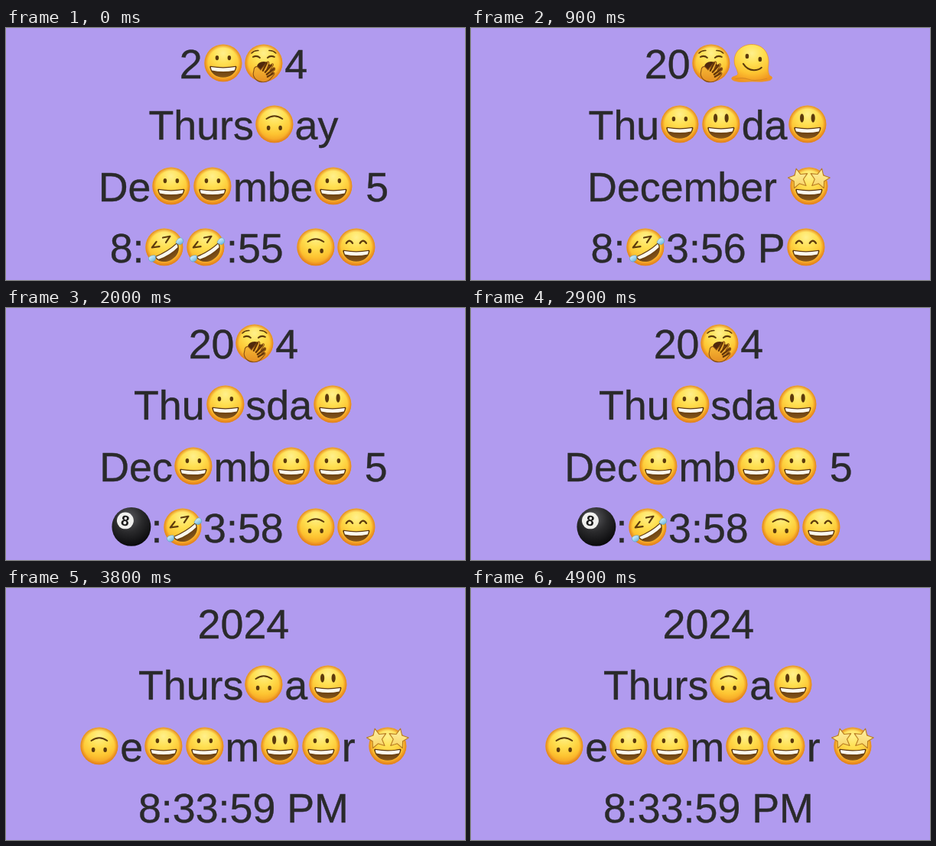
Animation, 600 px wide and 330 px high, one loop 5 s. Source, as an HTML page:

```html
<!DOCTYPE html>
<html lang="en">
<head>
<meta charset="utf-8">
<title>Emoji clock</title>
<style>
  html, body { margin: 0; width: 100%; height: 100%; overflow: hidden; background: #b19bef; }
  #reel { animation: flip 5s step-end infinite; }
  .scene { position: relative; width: 600px; height: 330px; overflow: hidden; }
  .row {
    position: absolute; left: 10.4px; width: 600px; height: 80px;
    font: 53.75px/80px "Liberation Sans", Arial, Helvetica, sans-serif;
    color: #2a2a2b; -webkit-text-stroke: .4px #2a2a2b;
    text-align: center; white-space: pre;
  }
  .row svg { width: 1em; height: 1em; vertical-align: -7px; overflow: visible; -webkit-text-stroke: 0; }
  .defs { position: absolute; width: 0; height: 0; }
  @keyframes flip {
    0% { transform: translateY(0); }
    4% { transform: translateY(-330px); }
    22% { transform: translateY(-660px); }
    39% { transform: translateY(-990px); }
    60% { transform: translateY(-1320px); }
    75%, 100% { transform: translateY(-1650px); }
  }
</style>
</head>
<body>
<svg class="defs">
  <defs>
    <radialGradient id="skin" cx=".5" cy=".24" r=".78">
      <stop offset="0" stop-color="#fff08c"/>
      <stop offset=".35" stop-color="#ffe052"/>
      <stop offset=".68" stop-color="#fdc431"/>
      <stop offset="1" stop-color="#f09320"/>
    </radialGradient>
    <radialGradient id="rim" cx=".5" cy=".5" r=".5">
      <stop offset=".8" stop-color="#e8801c" stop-opacity="0"/>
      <stop offset="1" stop-color="#dc7a1c" stop-opacity=".85"/>
    </radialGradient>
    <radialGradient id="ball" cx=".42" cy=".28" r=".72">
      <stop offset="0" stop-color="#5c5c60"/>
      <stop offset=".5" stop-color="#2a2a2c"/>
      <stop offset="1" stop-color="#0a0a0c"/>
    </radialGradient>
    <linearGradient id="mouth" x2="0" y2="1">
      <stop offset="0" stop-color="#55300c"/>
      <stop offset="1" stop-color="#87571a"/>
    </linearGradient>
    <linearGradient id="hand" x2="0" y2="1">
      <stop offset="0" stop-color="#fcc53a"/>
      <stop offset="1" stop-color="#e58f22"/>
    </linearGradient>
    <linearGradient id="gold" x2="0" y2="1">
      <stop offset="0" stop-color="#fff2a6"/>
      <stop offset="1" stop-color="#f8d466"/>
    </linearGradient>
    <linearGradient id="tear" x2="0" y2="1">
      <stop offset="0" stop-color="#d4f0fb"/>
      <stop offset="1" stop-color="#6db6e0"/>
    </linearGradient>
  </defs>
</svg>
<div id="reel"></div>
<script>
const INK = '#5c3a0c';
const skin = '<circle r="24.6" fill="url(#skin)"/><circle r="24.6" fill="url(#rim)"/>';

const line = (d, w = 2, color = INK) =>
  `<path d="${d}" fill="none" stroke="${color}" stroke-width="${w}" stroke-linecap="round" stroke-linejoin="round"/>`;
const move = (how, body) => `<g transform="${how}">${body}</g>`;
const mirror = body => body + move('scale(-1 1)', body);
const eyes = (x, y, rx, ry) =>
  mirror(`<ellipse cx="${x}" cy="${y}" rx="${rx}" ry="${ry}" fill="${INK}"/>`);

const grin = `
  <path d="M-16.5 4Q0 7 16.5 4Q18 4 17.6 6C16 14 9 19 0 19S-16 14-17.6 6Q-18 4-16.5 4Z" fill="url(#mouth)"/>
  <path d="M-16 5.2Q0 8.2 16 5.2Q16.2 7.6 14.8 9.6Q0 13-14.8 9.6Q-16.2 7.6-16 5.2Z" fill="#fbf8ee"/>`;
const squint = mirror(line('M5-11.5L14-8L5-4', 2.2));

function star(x, y, turn) {
  const pts = [];
  for (let i = 0; i < 10; i++) {
    const r = i % 2 ? 6.6 : 13.6, a = i * Math.PI / 5 - Math.PI / 2;
    pts.push((r * Math.cos(a)).toFixed(1) + ',' + (r * Math.sin(a)).toFixed(1));
  }
  return move(`translate(${x} ${y}) rotate(${turn})`,
    `<polygon points="${pts.join(' ')}" fill="url(#gold)" stroke="#b87c22" stroke-width="1.1" stroke-linejoin="round"/>`);
}

const drop = '<path d="M16 3C21-1 26.5 0 26 4.5C25.5 9 20 9.5 18 7Q16.5 5.5 16 3Z" fill="url(#tear)" stroke="#5a9fc4" stroke-width=".6"/>';

const yawn = skin
  + line('M-16-13Q-12-17-7-16.5', 1.5) + line('M7-16.5Q12-17 16-13', 1.5)
  + line('M-14-8Q-9-10.5-5-7', 2) + line('M5-7Q9-10.5 14-8', 2)
  + '<ellipse cx="0" cy="5" rx="9" ry="7" fill="#50290c"/>'
  + `<path d="M-12.5 7Q-10 3-7 6L-4 9L4-1Q6.5-3 7 0L4 8L10 1.5Q13 0 12.5 3L8 10L13 6Q15.5 6 14.5 9
      L9 14L13 12.5Q15 13 13.5 15.5C9 20 7 25 0 25C-8 25.5-13.5 20-13.8 14Z"
      fill="url(#hand)" stroke="#8a5014" stroke-width="1.1"/>`
  + ['M4 0L-1 10', 'M10 3L2 12', 'M13 8L4 15', 'M12 14L5 18'].map(d => line(d, 2.4, '#643608')).join('');

const melt = `
  <path d="M-22 3C-26-13-14-24.5 0-24.5C15-24.5 24-13 22 3C21 10 22 14 24 17C29 18 27 23 20 23.5
    C12 25.5 2 23.5-6 24.5C-15 25.5-28 24-26 19.5C-25 17-19 18-18 14Q-19 9-22 3Z"
    fill="url(#skin)" stroke="#e9962a" stroke-width=".8"/>`
  + line('M-21 21Q-12 18.5-4 21.5T20 20.5', 1.2, '#d98a22')
  + `<ellipse cx="-6" cy="-9" rx="2.3" ry="3.2" fill="${INK}"/>
     <ellipse cx="11" cy="-5" rx="2.3" ry="3.2" fill="${INK}"/>`
  + line('M-11 1Q-6 9 3 9.5Q9 9.5 13 6');

const faces = {
  '😀': skin + eyes(8, -6.8, 2.3, 3.1) + grin,
  '😃': skin + eyes(7.3, -8, 2.6, 5.8) + grin,
  '😄': skin + mirror(line('M4.8-5Q9-11.5 13.2-5', 2.2)) + grin,
  '😆': skin + squint + grin,
  '🙃': skin + move('rotate(180)', eyes(7.8, -5, 2.3, 3.2) + line('M-10.5 7Q0 14.5 10.5 7', 1.9)),
  '🤣': skin + move('rotate(-32)', squint + grin + mirror(drop)),
  '🤩': skin + grin + star(-14, -9.5, -12) + star(14, -9.5, 12),
  '🥱': yawn,
  '🫠': melt,
  '🎱': `<circle cx="1" cy="-.5" r="25.6" fill="url(#ball)"/><circle cx="-7" cy="-8.5" r="11" fill="#f0f0ee"/>
    <text transform="translate(-7 -8.5) rotate(10)" y="6.6" text-anchor="middle" fill="#1a1a1a"
      font-family="Liberation Sans, Arial, sans-serif" font-weight="700" font-size="19">8</text>`
};

const tops = [7, 87, 168, 248];
const scenes = [
  ['2😀🥱4', 'Thurs🙃ay', 'De😀😀mbe😀 5', '8:🤣🤣:55 🙃😄'],
  ['20🥱🫠', 'Thu😀😃da😃', 'December 🤩', '8:🤣3:56 P😄'],
  ['2024', 'Th😆rsd😀y', 'Dec😀m😃er 5', '8:33:56 PM'],
  ['20🥱4', 'Thu😀sda😃', 'Dec😀mb😀😀 5', '🎱:🤣3:58 🙃😄'],
  ['2024', 'Th😆rs🙃ay', 'D😀😀😀mb😀r 5', '8:🤣3:🤩9 PM'],
  ['2024', 'Thurs🙃a😃', '🙃e😀😀m😃😀r 🤩', '8:33:59 PM']
];

const glyph = c => faces[c] ? `<svg viewBox="-27 -27 54 54">${faces[c]}</svg>` : c;
const row = (text, i) => `<div class="row" style="top:${tops[i]}px">${[...text].map(glyph).join('')}</div>`;
document.getElementById('reel').innerHTML =
  scenes.map(s => `<div class="scene">${s.map(row).join('')}</div>`).join('');
</script>
</body>
</html>
```
